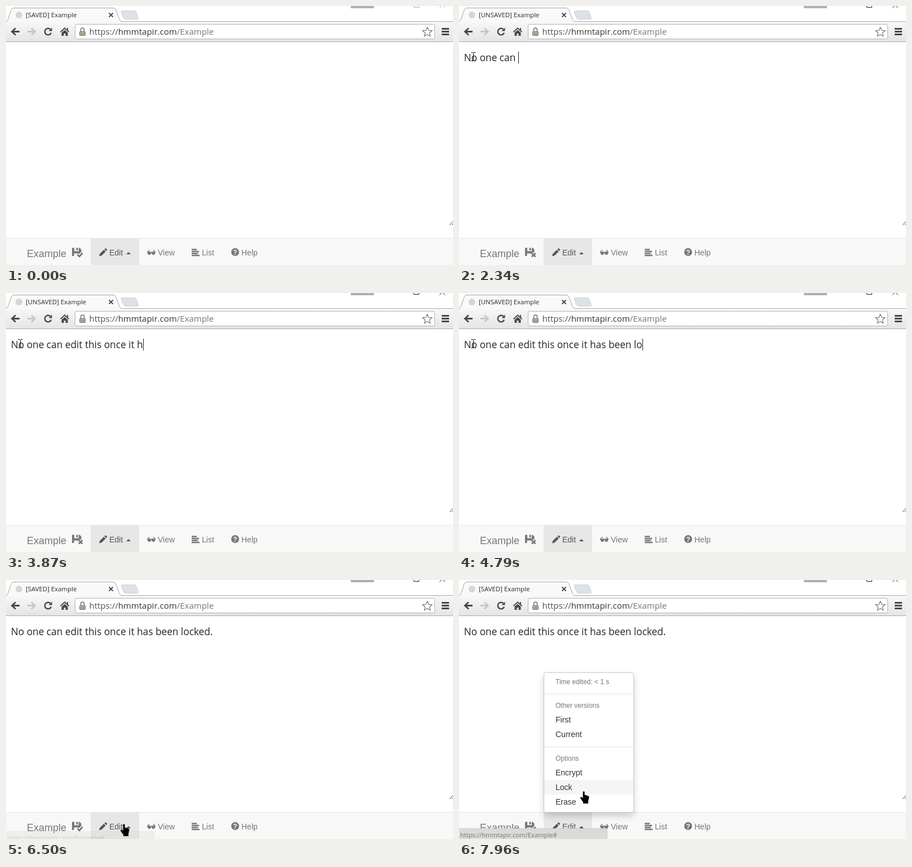
Animation of 792 by 460 pixels, one loop 8000 ms. Source, as an HTML page:

```html
<!DOCTYPE html>
<html lang="en">
<head>
<meta charset="utf-8">
<title>Locking a page</title>
<style>
  html, body { margin: 0; width: 100%; height: 100%; overflow: hidden; background: #fff; }
  svg { display: block; width: 792px; height: 460px; }
  text { white-space: pre; font-family: "Liberation Sans", Arial, sans-serif; font-size: 14px; fill: #777; }
  .ui { font-family: "Open Sans", "Noto Sans", sans-serif; }
  .small { font-size: 12px; }
  .item { fill: #333; }
  .line { fill: none; stroke: #4d4645; }
  .icon { fill: #777; }
  .active { fill: #555; }
  #menu > rect:first-child { filter: drop-shadow(0 6px 6px rgba(0, 0, 0, .175)); }
</style>
</head>
<body>
<svg viewBox="0 0 792 460">
  <defs>
    <linearGradient id="bar" x2="0" y2="1">
      <stop stop-color="#f8f8f8"/><stop offset="1" stop-color="#e4e4e4"/>
    </linearGradient>
  </defs>

  <!-- window buttons and tabs -->
  <rect x="611" width="41" height="4" fill="#b0b0b0"/>
  <path id="winButtons" class="line" d="M722.5 0V2.5H731.5V0M768 3.5L774-2.5M778 3.5L772-2.5"/>
  <path d="M206.500 8.500H227q3 0 4 3l3.500 10q.5 2-2 2H212q-3 0-4-3l-4-10q-.5-2 2.500-2z" fill="#dde2e9" stroke="#ccd1d9"/>
  <rect y="27" width="792" height="37" fill="url(#bar)"/>
  <path d="M0 27.500H792M0 63.500H792" stroke="#aaa"/>
  <path d="M0 28C3 27 3.500 24 4.500 21L9 7.500Q10.500 3.500 14 3.500H190Q193.500 3.500 195 7.500L200 21C201 24 202 27 206 28z" fill="#f9f9f9"/>
  <path d="M0 27.500C3 26.500 3.500 24 4.500 21L9 7.500Q10.500 3.500 14 3.500H190Q193.500 3.500 195 7.500L200 21C201 24 202 27 206 27.500" class="line" style="stroke:#a2a2a2"/>
  <circle cx="23" cy="16" r="6" fill="#d6d6d6"/>
  <text id="tab" class="ui" x="35" y="20" style="font-size:11.400px;fill:#2a2a2a"></text>
  <path class="line" d="M182.500 12.500l7 7m0-7l-7 7" stroke-width="1.800"/>

  <!-- toolbar -->
  <path class="line" d="M24 45.500H11M17 39.500L10.500 45.500L17 51.500" stroke-width="2.800"/>
  <path class="line" d="M38 45.500H51M45 39.500L51.500 45.500L45 51.500" stroke-width="2.800" style="stroke:#c6c6c6"/>
  <path class="line" d="M78.500 41.300A5.800 5.800 0 1 0 80 47.500" stroke-width="2.400"/>
  <path d="M81.500 38.500v6h-6z" fill="#4d4645"/>
  <path class="line" d="M96.500 46.300L104 39.300l7.500 7M109 39v4" stroke-width="1.900"/>
  <path d="M98.500 47.500L104 42.400l5.500 5.100V53h-4v-4h-3v4h-4z" fill="#4d4645"/>
  <rect x="122.500" y="32.500" width="637" height="26" rx="2" fill="#fff" stroke="#b4b4b4"/>
  <path class="line" d="M132.500 46v-4a3 3 0 0 1 6 0v4" stroke-width="1.600" style="stroke:#747a70"/>
  <rect x="130.500" y="45.500" width="10" height="7" rx="1" fill="#bbb09c" stroke="#6d6e66"/>
  <path d="M132 48.500h7M132 50.500h7" stroke="#938a79"/>
  <text class="ui" x="147.500" y="51" style="font-size:15px"><tspan fill="#505050">https://</tspan><tspan fill="#333">hmmtapir.com</tspan>/Example</text>
  <path id="star" class="line" stroke-width="1.200" stroke-linejoin="round" style="stroke:#777"/>
  <path class="line" d="M772 40.500h13M772 45.500h13M772 50.500h13" stroke-width="3"/>

  <!-- editor -->
  <text id="typed" class="ui" x="8.800" y="97.500" style="font-size:17.250px;fill:#262626"></text>
  <path id="caret" d="M.5 81V102" stroke="#222"/>
  <path class="line" d="M786 389l7-7.500M790 389l3-3"/>

  <!-- bottom bar -->
  <rect y="412" width="792" height="48" fill="#f8f8f8"/>
  <path d="M0 412.500H792" stroke="#e7e7e7"/>
  <rect x="150" y="413" width="86" height="47" fill="#e7e7e7"/>
  <text x="37" y="446" style="font-size:18px">Example</text>
  <path class="icon" fill-rule="evenodd" d="M117 429.500h4v6h8v-6h1.500l3 3V444H117zM124.500 429.500h3v4.500h-3zM120.500 439.500h7V444h-7z"/>
  <g id="mark" fill="none">
    <path stroke="#f8f8f8" stroke-width="6"/>
    <path stroke="#777" stroke-width="2.800"/>
  </g>
  <path class="active" d="M165 444.500l1.200-4.500 7.200-7 3.200 3.200-7.200 7.100zM174.300 432l1.400-1.300q.8-.6 1.600.1l1.500 1.500q.8.800 0 1.600l-1.300 1.300z"/>
  <text class="active" x="183" y="443">Edit</text>
  <path class="active" d="M213 441l4-4 4 4z"/>
  <path class="icon" d="M250 437l2.500-3.500h2v1.200h-1.500l-1 1.500h4.200l1.300.7 1.300-.7h4.200l-1-1.500h-1.500v-1.200h2l2.500 3.500v1.500h-.8q-.5 3.500-3.200 3.500t-3-3.500h-1q-.3 3.500-3 3.500t-3.200-3.500h-.8z"/>
  <text x="269" y="443">View</text>
  <path class="line" d="M329 432.500h9M329 436h13M329 439.500h11M329 443h14" stroke-width="2.300" style="stroke:#777"/>
  <text x="347" y="443">List</text>
  <circle class="icon" cx="406" cy="437" r="7"/>
  <text x="406" y="441.500" text-anchor="middle" style="font-size:12px;font-weight:bold;fill:#f8f8f8">?</text>
  <text x="417" y="443">Help</text>

  <!-- drop-up menu -->
  <g id="menu">
    <rect x="150.500" y="164.500" width="159" height="248" rx="3" fill="#fff" stroke="#c8c8c8"/>
    <rect id="hover" x="151" width="158" height="26" fill="#f5f5f5"/>
    <path d="M151 202.500H309M151 296.500H309" stroke="#e5e5e5"/>
    <text class="small" x="171" y="185">Time edited: &lt; 1 s</text>
    <text class="small" x="171" y="227">Other versions</text>
    <text class="item" x="171" y="253">First</text>
    <text class="item" x="171" y="279">Current</text>
    <text class="small" x="171" y="321">Options</text>
    <text class="item" x="171" y="347">Encrypt</text>
    <text class="item" x="171" y="373">Lock</text>
    <text class="item" x="171" y="399">Erase</text>
  </g>

  <g id="status">
    <path d="M0 441H260q3 0 3 3V461H0z" fill="#dadada"/>
    <path class="line" d="M0 441.500H260q2.500 0 2.500 3V461" style="stroke:#cdcdcd"/>
    <text class="ui" x="2" y="457" style="font-size:11.200px">https://hmmtapir.com/Example#</text>
  </g>

  <path id="beam" fill="none" stroke="#000" d="M-4-7.500H-1L0-6.500 1-7.500H4M0-6.500V6.500M-4 7.500H-1L0 6.500 1 7.500H4"/>
  <path id="hand" d="M-1.500 1.500q1.500-2.500 3 0V7l1.500-.4 1.500 1 1.500-.2 1.200 1.100 1.600.2q.7.800.7 2.300L8 17.500V22H-1V19.500L-5 14q-1.800-2.500-.5-3.500 1.500-.8 4 2z"/>
</svg>
<script>
const LOOP = 8000, STEP = 77;
const FOCUS = 640, FIRST_KEY = 1260, SAVE = 6190, MENU = 6570;
const MESSAGE = "No one can edit this once it has been locked.";

// typing pace: [time, letters]
const PACE = [[FIRST_KEY, 1], [1490, 1], [2190, 10], [2720, 15], [3490, 27], [3870, 30], [5260, 45]];

// pointer stops: [time, x, y]
const STOPS = [
  [70, 400, 338], [713, 26, 90], [5487, 26, 90], [5718, 81, 136], [6334, 209, 433],
  [6873, 209, 433], [7104, 210, 376], [7720, 210, 375], [7951, 221, 375]
];

const $ = id => document.getElementById(id);
const show = (id, on) => $(id).setAttribute("visibility", on ? "visible" : "hidden");
const move = (id, x, y) => $(id).setAttribute("transform", `translate(${x} ${y})`);
const clamp = v => Math.min(1, Math.max(0, v));

// straight-line blend between timed keys, rounded to whole units
function along(keys, t) {
  const next = Math.max(1, keys.findIndex(k => k[0] > t));
  const i = t >= keys.at(-1)[0] ? keys.length - 1 : next;
  const [a, b] = [keys[i - 1], keys[i]];
  const k = clamp((t - a[0]) / (b[0] - a[0]));
  return a.slice(1).map((v, n) => Math.round(v + (b[n + 1] - v) * k));
}

function draw(t) {
  // the screen is sampled at a fixed rate
  const tick = Math.floor((t - 20) / STEP) * STEP + 20;
  const [x, y] = along(STOPS, tick);
  const overLink = y > 413 || t > MENU;
  show("beam", t >= 70 && !overLink);
  show("hand", overLink);
  move("beam", x - .5, y);
  move("hand", x, y);

  const typed = $("typed");
  typed.textContent = MESSAGE.slice(0, t < FIRST_KEY ? 0 : along(PACE, t)[0]);
  move("caret", Math.round(9 + typed.getComputedTextLength()), 0);
  show("caret", t >= FOCUS && t < 5770);

  $("winButtons").style.stroke = t < FOCUS ? "#b0b0b0" : "#222";
  $("tab").textContent = t >= 1490 && t < SAVE ? "[UNSAVED] Example" : "[SAVED] Example";
  const dirty = t >= 1330 && t < SAVE;
  for (const p of $("mark").children)
    p.setAttribute("d", dirty ? "M129 439l6.500 6.500m0-6.500l-6.500 6.500" : "M126.500 441.500l3.500 3.500 5.500-6.500");

  show("menu", t >= MENU);
  const row = Math.floor((y - 355) / 26);
  show("hover", t >= MENU && (row === 0 || row === 1));
  $("hover").setAttribute("y", 355 + 26 * row);

  const rise = clamp((tick - 6334) / 308);
  $("status").setAttribute("opacity", rise ** 1.6);
  move("status", 0, Math.round(10 * (1 - rise)));
}

const starPoints = Array.from({ length: 10 }, (_, i) => {
  const a = i * Math.PI / 5, r = i % 2 ? 4 : 9;
  return `${(746.5 + r * Math.sin(a)).toFixed(1)} ${(46.5 - r * Math.cos(a)).toFixed(1)}`;
});
$("star").setAttribute("d", `M${starPoints.join("L")}z`);

const began = performance.now();
function frame() {
  draw((performance.now() - began) % LOOP);
  requestAnimationFrame(frame);
}
frame();
</script>
</body>
</html>
```
